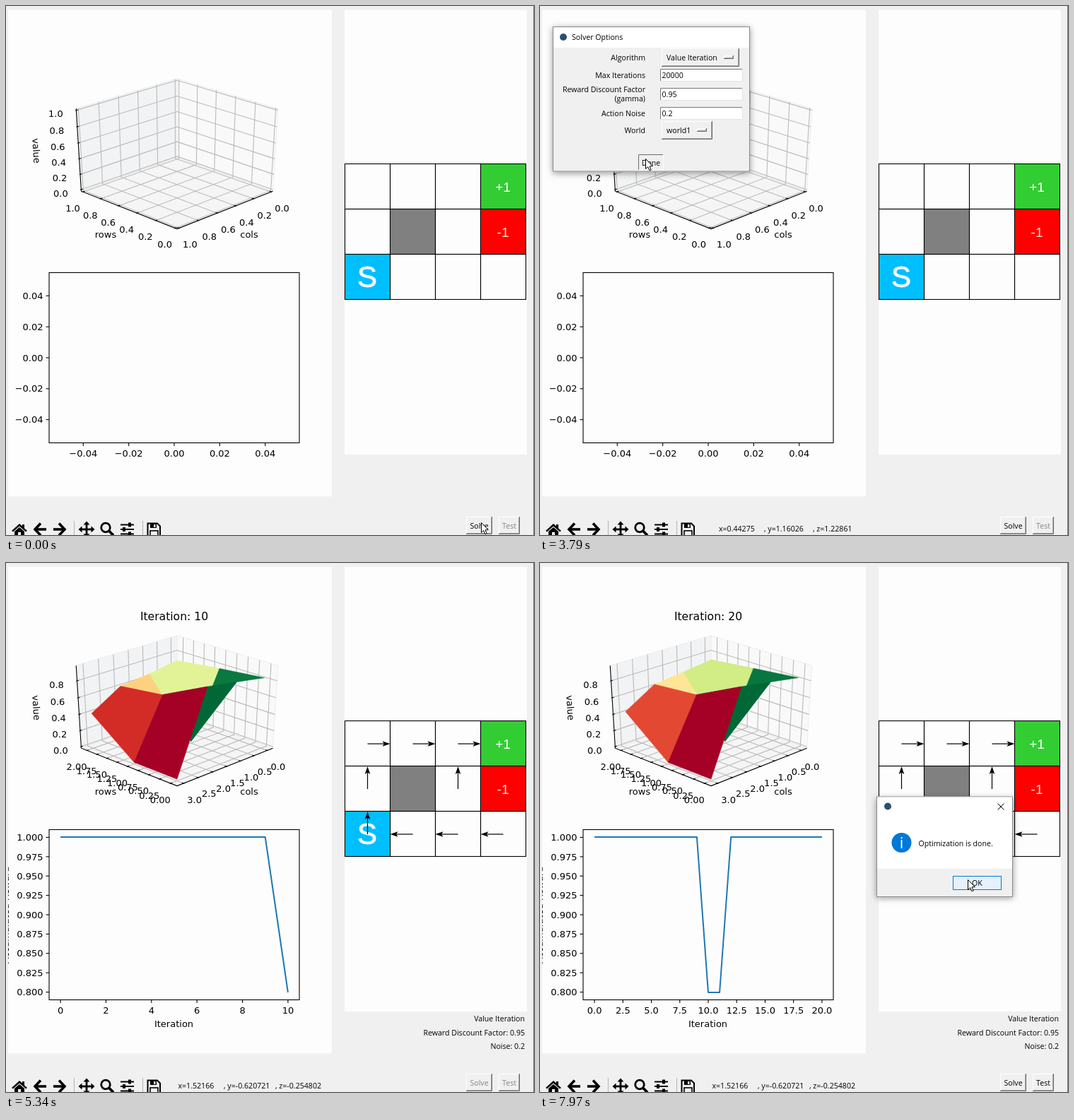
Animation, 747 px wide and 749 px high, one loop 8 s. Source, as an HTML page with a canvas:

```html
<!DOCTYPE html>
<html lang="en">
<head>
<meta charset="utf-8">
<title>Value iteration</title>
<style>
html, body { margin: 0; width: 100%; height: 100%; overflow: hidden; background: #f0f0f0; }
canvas { display: block; }
</style>
</head>
<body>
<canvas id="stage" width="747" height="749"></canvas>
<script>
const g = document.getElementById('stage').getContext('2d');
const LOOP = 8000;
const PLOT = '13px "DejaVu Sans", sans-serif';
const TITLE = '15.6px "DejaVu Sans", sans-serif';
const UI = '10.6px "Open Sans", sans-serif';
const BIG = '"Liberation Sans", Arial, sans-serif';

// ---- drawing helpers ----
function rect(x, y, w, h, fill, stroke, lw = 1) {
  if (fill) { g.fillStyle = fill; g.fillRect(x, y, w, h); }
  if (stroke) { g.strokeStyle = stroke; g.lineWidth = lw; g.strokeRect(x, y, w, h); }
}
function trace(pts, closed) {
  g.beginPath();
  pts.forEach(([x, y], i) => i ? g.lineTo(x, y) : g.moveTo(x, y));
  if (closed) g.closePath();
}
function line(pts, color = '#000', lw = 1) {
  trace(pts);
  g.strokeStyle = color; g.lineWidth = lw; g.stroke();
}
function poly(pts, fill, stroke, lw = 1) {
  trace(pts, true);
  g.fillStyle = fill; g.fill();
  if (stroke) { g.strokeStyle = stroke; g.lineWidth = lw; g.stroke(); }
}
function disc(x, y, r, fill) {
  g.beginPath(); g.arc(x, y, r, 0, 7);
  g.fillStyle = fill; g.fill();
}
function text(s, x, y, font = UI, align = 'left', color = '#000') {
  g.font = font; g.textAlign = align; g.textBaseline = 'alphabetic'; g.fillStyle = color;
  g.fillText(s, x, y + parseFloat(font) * 0.36);
}
function turned(s, x, y, angle) {
  g.save();
  g.translate(x, y); g.rotate(angle);
  text(s, 0, 0, PLOT, 'center');
  g.restore();
}

// ---- grid world solver ----
const DIRS = [[-1, 0], [0, 1], [1, 0], [0, -1]];
const GAMMA = 0.95, NOISE = 0.2;
const isWall = (r, c) => r === 1 && c === 1;
const exitReward = (r, c) => c === 3 && r < 2 ? (r ? -1 : 1) : 0;

function step(V, r, c, d) {
  const [dr, dc] = DIRS[(d + 4) % 4];
  let nr = r + dr, nc = c + dc;
  if (nr < 0 || nr > 2 || nc < 0 || nc > 3 || isWall(nr, nc)) { nr = r; nc = c; }
  return exitReward(nr, nc) || GAMMA * V[nr][nc];
}
function actions(V, r, c) {
  return DIRS.map((_, d) => (1 - NOISE) * step(V, r, c, d) +
    NOISE / 2 * (step(V, r, c, d - 1) + step(V, r, c, d + 1)));
}
const sweep = V => V.map((row, r) => row.map((_, c) =>
  isWall(r, c) || exitReward(r, c) ? 0 : Math.max(...actions(V, r, c))));

const values = [[0, 1, 2].map(() => [0, 0, 0, 0])];
for (let k = 0; k < 22; k++) values.push(sweep(values[k]));

// ---- axes helpers ----
function ticks(lo, hi) {
  const span = hi - lo, base = 10 ** (Math.floor(Math.log10(span)) - 1);
  const size = [1, 2, 2.5, 5, 10, 20].map(m => m * base).find(s => span / s <= 9);
  let digits = 0;
  while (digits < 4 && Math.abs(size * 10 ** digits - Math.round(size * 10 ** digits)) > 1e-6) digits++;
  const out = [];
  for (let i = Math.ceil(lo / size - 1e-6); i * size <= hi + 1e-6; i++)
    out.push({ v: i * size, s: (i * size).toFixed(digits).replace(/^-/, '\u2212') });
  return out;
}
function limits(lo, hi) {
  const pad = hi === lo ? 0.055 : (hi - lo) * 0.05;
  return [lo - pad, hi + pad];
}

// ---- 3D plot: unit cube seen from 45 degrees, 30 degrees up ----
const EDGE = 1 / 48, LO = -EDGE, HI = 1 + EDGE;
const COS = Math.sqrt(3) / 2, SIN = 0.5;
function view(r, c, z) {
  const side = (1 - r - c) * Math.SQRT1_2, near = (c - r) * Math.SQRT1_2, up = z - 0.5;
  const depth = 10 - near * COS - up * SIN;
  return [242 + 1888 * side / depth, 205.2 - 1296 * (up * COS - near * SIN) / depth, depth];
}
const RAMP = ['a50026', 'd73027', 'f46d43', 'fdae61', 'fee08b', 'ffffbf',
  'd9ef8b', 'a6d96a', '66bd63', '1a9850', '006837'];
function ramp(u) {
  const p = Math.min(9.9999, Math.max(0, u * 10)), i = Math.floor(p);
  const ch = (k, j) => parseInt(RAMP[k].substr(j * 2, 2), 16);
  return `rgb(${[0, 1, 2].map(j => Math.round(ch(i, j) + (ch(i + 1, j) - ch(i, j)) * (p - i)))})`;
}

function cube(V) {
  const rl = V ? [-0.1, 2.1] : [0, 1], cl = V ? [-0.15, 3.15] : [0, 1];
  const zl = [0, V ? Math.max(...V.flat()) : 1];
  const norm = (v, [a, b]) => (v - a) / (b - a);
  const path = (...p) => p.map(q => view(...q));

  poly(path([HI, HI, LO], [HI, LO, LO], [HI, LO, HI], [HI, HI, HI]), '#f2f3f4', '#ebeced');
  poly(path([HI, LO, LO], [LO, LO, LO], [LO, LO, HI], [HI, LO, HI]), '#f9f9f9', '#eeeeee');
  poly(path([HI, HI, LO], [HI, LO, LO], [LO, LO, LO], [LO, HI, LO]), '#f5f5f5', '#ebebeb');

  const rt = ticks(...rl), ct = ticks(...cl), zt = ticks(...zl);
  const grid = '#bababa';
  rt.forEach(t => { t.n = norm(t.v, rl); line(path([t.n, HI, LO], [t.n, LO, LO], [t.n, LO, HI]), grid, 1.1); });
  ct.forEach(t => { t.n = norm(t.v, cl); line(path([LO, t.n, LO], [HI, t.n, LO], [HI, t.n, HI]), grid, 1.1); });
  zt.forEach(t => { t.n = norm(t.v, zl); line(path([HI, HI, t.n], [HI, LO, t.n], [LO, LO, t.n]), grid, 1.1); });

  line(path([HI, HI, HI], [HI, HI, LO], [LO, HI, LO], [LO, LO, LO]), '#000', 1.1);
  const IN = 0.017, OUT = 0.0083;
  const mark = (a, b, p, dx, dy, s) => {
    line(path(a, b), '#000', 1.1);
    const [x, y] = view(...p);
    text(s, x + dx, y + dy, PLOT, 'center');
  };
  rt.forEach(({ n, s }) => mark([n, HI - IN, LO], [n, HI + OUT, LO], [n, HI, LO], -14.5, 23, s));
  ct.forEach(({ n, s }) => mark([LO + IN, n, LO], [LO - OUT, n, LO], [LO, n, LO], 15.5, 23, s));
  zt.forEach(({ n, s }) => mark([HI, HI - IN, n], [HI, HI + OUT, n], [HI, HI, n], -29, 5, s));
  text('rows', 141, 323, PLOT, 'center');
  text('cols', 344, 323, PLOT, 'center');
  turned('value', 43, 205, 1.51);

  if (!V) return;
  const faces = [];
  for (let r = 0; r < 2; r++) for (let c = 0; c < 3; c++) {
    const cs = [[r, c], [r, c + 1], [r + 1, c + 1], [r + 1, c]];
    const pts = cs.map(([a, b]) => view(norm(a, rl), norm(b, cl), norm(V[a][b], zl)));
    faces.push({
      pts,
      mean: cs.reduce((s, [a, b]) => s + V[a][b], 0) / 4,
      depth: pts.reduce((s, p) => s + p[2], 0)
    });
  }
  const means = faces.map(f => f.mean), low = Math.min(...means), high = Math.max(...means);
  faces.sort((a, b) => b.depth - a.depth).forEach(f => {
    const col = ramp((f.mean - low) / (high - low));
    poly(f.pts, col, col, 0.5);
  });
}

// ---- reward chart ----
const reward = i => i === 10 || i === 11 ? 0.8 : 1;
function chart(n) {
  const L = 61, R = 415, T = 377.5, B = 618.5, solved = n >= 0;
  const ys = Array.from({ length: Math.max(0, n + 1) }, (_, i) => reward(i));
  const xl = limits(0, Math.max(0, n));
  const yl = solved ? limits(Math.min(...ys), Math.max(...ys)) : limits(0, 0);
  const px = v => L + (v - xl[0]) / (xl[1] - xl[0]) * (R - L);
  const py = v => B - (v - yl[0]) / (yl[1] - yl[0]) * (B - T);
  let wide = 0;
  rect(L, T, R - L, B - T, null, '#000', 1.1);
  for (const { v, s } of ticks(...xl)) {
    line([[px(v), B], [px(v), B + 4.5]], '#000', 1.1);
    text(s, px(v), 633, PLOT, 'center');
  }
  for (const { v, s } of ticks(...yl)) {
    line([[L, py(v)], [L - 4.5, py(v)]], '#000', 1.1);
    text(s, 52.5, py(v), PLOT, 'right');
    wide = Math.max(wide, g.measureText(s).width);
  }
  if (!solved) return;
  g.lineJoin = 'round';
  line(ys.map((y, i) => [px(i), Math.round(py(y))]), '#1f77b4', 2);
  g.lineJoin = 'miter';
  text('Iteration', 237.5, 652, PLOT, 'center');
  turned('Accumulated Reward', 37 - wide, 498.5, -Math.PI / 2);
}

// ---- maze ----
function maze(V) {
  const X = c => 479.5 + 64 * c, Y = r => 223.5 + 64 * r;
  const fills = { '0,3': '#32cd32', '1,3': '#ff0000', '1,1': '#808080', '2,0': '#00bfff' };
  for (let r = 0; r < 3; r++) for (let c = 0; c < 4; c++)
    rect(X(c), Y(r), 64, 64, fills[[r, c]], '#000', 1.1);
  text('+1', 703, 256, '19px ' + BIG, 'center', '#fff');
  text('-1', 703, 320, '19px ' + BIG, 'center', '#ffe9d8');
  text('S', 511, 382.5, '42px ' + BIG, 'center', '#fff');
  g.strokeStyle = '#fff'; g.lineWidth = 0.8;
  g.strokeText('S', 511, 382.5 + 42 * 0.36);
  if (!V) return;
  for (let r = 0; r < 3; r++) for (let c = 0; c < 4; c++) {
    if (isWall(r, c) || exitReward(r, c)) continue;
    const q = actions(V, r, c), d = q.indexOf(Math.max(...q));
    g.save();
    g.translate(X(c) + 32, Y(r) + 32.5);
    g.rotate((d - 1) * Math.PI / 2);
    line([[0, 0], [26, 0]], '#000', 1.2);
    poly([[32, 0], [21, -3.8], [23.5, 0], [21, 3.8]], '#000');
    g.restore();
  }
}

// ---- window furniture ----
function bevel(x, y, w, h, sunken) {
  const a = sunken ? '#696969' : '#ffffff', b = sunken ? '#ffffff' : '#696969';
  rect(x, y, w, h, '#f0f0f0');
  line([[x + .5, y + h], [x + .5, y + .5], [x + w, y + .5]], a);
  line([[x, y + h - .5], [x + w - .5, y + h - .5], [x + w - .5, y]], b);
  if (!sunken) line([[x + 1, y + h - 1.5], [x + w - 1.5, y + h - 1.5], [x + w - 1.5, y + 1]], '#a8a8a8');
}
function button(s, x, y, w, h, off, sunken) {
  bevel(x, y, w, h, sunken);
  text(s, x + w / 2, y + h / 2 + .5, UI, 'center', off ? '#858585' : '#000');
}
function frame(x, y, w, h) {
  g.save();
  g.shadowColor = 'rgba(0,0,0,.4)'; g.shadowBlur = 9; g.shadowOffsetY = 2;
  rect(x, y, w, h, '#f0f0f0');
  g.restore();
  rect(x + .5, y + .5, w - 1, h - 1, null, '#8a8a8a');
}
function cross(x, y) {
  line([[x - 4.5, y - 4.5], [x + 4.5, y + 4.5]]);
  line([[x + 4.5, y - 4.5], [x - 4.5, y + 4.5]]);
}

function toolbar() {
  poly([[8, 743], [19, 733], [23, 736.5], [23, 734], [26, 734], [26, 739.5], [30, 743], [28, 744.5], [19, 736.5], [10, 744.5]], '#000');
  poly([[12, 744], [19, 738], [26, 744], [26, 750], [21, 750], [21, 745], [17, 745], [17, 750], [12, 750]], '#000');
  for (const [x, k] of [[48, 1], [76, -1]]) {
    line([[x + k, 732.5], [x - 7 * k, 741], [x + k, 749.5]], '#000', 3.6);
    line([[x - 6 * k, 741], [x + 9 * k, 741]], '#000', 3.6);
  }
  for (const x of [96.5, 193.5]) line([[x, 729], [x, 749]], '#b4b4b4');
  for (let i = 0; i < 4; i++) {
    g.save();
    g.translate(114, 741); g.rotate(i * Math.PI / 2);
    line([[0, 0], [0, -8]], '#000', 2.8);
    poly([[0, -11.5], [4.5, -6.5], [-4.5, -6.5]], '#000');
    g.restore();
  }
  g.beginPath(); g.arc(141, 738.5, 6.3, 0, 7);
  g.lineWidth = 2.8; g.strokeStyle = '#000'; g.stroke();
  line([[145.5, 743], [152, 749.5]], '#000', 3.8);
  [[734.5, 175], [741, 167], [747.5, 175]].forEach(([y, x]) => {
    line([[162, y], [181, y]], '#000', 2);
    rect(x - 2, y - 3, 4, 6, '#000');
  });
  poly([[200.5, 732.5], [214, 732.5], [218, 736.5], [218, 752], [200.5, 752]], '#f0f0f0', '#000', 2);
  rect(204, 733, 9, 6, '#000');
  rect(209, 734, 2.5, 4, '#f0f0f0');
  rect(204, 743, 11, 9, '#f0f0f0', '#000', 1.6);
}

function optionsDialog(dx, dy, controls, pressed) {
  g.save();
  g.translate(dx, dy);
  frame(18, 29, 279, 205.5);
  rect(19, 30, 277, 29, '#fff');
  disc(33, 44, 5, '#2d4f6e');
  text('Solver Options', 45, 44);
  if (controls) {
    line([[180, 44.5], [190, 44.5]]);
    rect(224.5, 39.5, 9, 9, null, '#c4c4c4');
    cross(273, 44);
  }
  [['Algorithm', 73], ['Max Iterations', 98], ['Reward Discount Factor', 118], ['(gamma)', 131.5],
   ['Action Noise', 152], ['World', 176]].forEach(([s, y]) => text(s, 149, y, UI, 'right'));
  [['Value Iteration', 60, 110], ['world1', 163, 72]].forEach(([s, y, w]) => {
    bevel(172, y, w, 26);
    text(s, 179, y + 13);
    bevel(172 + w - 22, y + 10, 14, 5);
  });
  [['20000', 89], ['0.95', 116], ['0.2', 143]].forEach(([s, y]) => {
    rect(170, y, 117, 18, '#fff');
    line([[170.5, y + 18], [170.5, y + .5], [287, y + .5]], '#777');
    line([[170, y + 17.5], [286.5, y + 17.5], [286.5, y]], '#e3e3e3');
    text(s, 172.5, y + 9);
  });
  button('Done', 139, 210, 36, 23, false, pressed);
  g.restore();
}

function doneDialog(hover) {
  frame(476, 330.5, 193, 142.5);
  rect(477, 331.5, 191, 101.5, '#fff');
  disc(492, 344.5, 5, '#2d4f6e');
  cross(652, 345);
  disc(511.5, 396, 14, '#0078d7');
  text('i', 511.5, 396, '22px "Open Sans", sans-serif', 'center', '#fff');
  text('Optimization is done.', 535.5, 397);
  if (hover) rect(584.5, 443.5, 68, 19, '#e5f1fb', '#0078d7', 1);
  else rect(585, 444, 67, 18, '#e1e1e1', '#0078d7', 2);
  text('OK', 618.5, 453.5, UI, 'center');
}

// ---- pointer: time, x, y ----
const TRACK = [
  [0, 672, 731], [69, 672, 731], [70, 662, 724], [600, 662, 724], [1000, 330, 280], [1390, 52, 35],
  [1690, 2, 7], [2010, 2, 7], [2090, 14, 11], [2325, 14, 11], [2760, 157, 46], [2850, 157, 46],
  [3080, 183, 224], [3160, 175, 219], [3330, 175, 216], [3560, 149, 216], [3870, 149, 216],
  [4500, 300, 775], [5850, 700, 775], [6040, 716, 729], [7210, 716, 729], [7740, 640, 414], [7960, 605, 448]
];
function pointer(t) {
  const i = TRACK.findIndex(p => p[0] > t);
  if (i < 0) return TRACK[TRACK.length - 1].slice(1);
  const [t0, x0, y0] = TRACK[i - 1], [t1, x1, y1] = TRACK[i];
  const u = (t - t0) / (t1 - t0);
  return [x0 + (x1 - x0) * u, y0 + (y1 - y0) * u];
}
const ARROW = [[0, 0], [0, 14], [3.2, 11.2], [5.5, 16.4], [7.7, 15.4], [5.5, 10.4], [9.8, 10.2]];

// ---- scene ----
const FIRST = 4010, PERIOD = 126, LAG = 20;
const iteration = t => t < FIRST ? -1 : Math.min(20, Math.floor((t - FIRST) / PERIOD));

function draw(t) {
  const n = iteration(t), V = n < 0 ? null : values[n + 1];
  const running = t >= 3870, done = t >= 6700;
  const [mx, my] = pointer(t);

  rect(0, 0, 747, 749, '#f0f0f0');
  rect(3, 5.5, 458, 689, '#fdfdfd');
  rect(479, 5.5, 258, 629.5, '#fdfdfd');
  rect(746, 0, 1, 749, '#777');

  g.save();
  g.beginPath(); g.rect(3, 5, 458, 690); g.clip();
  cube(V);
  if (V) text('Iteration: ' + n, 238, 75, TITLE, 'center');
  chart(iteration(t - LAG));
  g.restore();

  maze(V);
  toolbar();
  if (t >= 4250) {
    text('x=1.52166', 243.5, 740.5); text(', y=-0.620721', 308, 740.5); text(', z=-0.254802', 381, 740.5);
  } else if (t >= 900) {
    text('x=0.44275', 253, 740.5); text(', y=1.16026', 317, 740.5); text(', z=1.22861', 386, 740.5);
  }
  if (running) ['Value Iteration', 'Reward Discount Factor: 0.95', 'Noise: 0.2']
    .forEach((s, i) => text(s, 734, 645.5 + 19.5 * i, UI, 'right'));
  button('Solve', 651, 723, 37, 25, running && !done);
  button('Test', 697, 723, 30, 25, !done);

  if (t >= 680 && !running) {
    const [hx, hy] = t < 2325 ? [14, 11] : t < 2760 ? [mx, my] : [157, 46];
    optionsDialog(hx - 157, hy - 46, t < 3700, t >= 3700);
  }
  if (done) doneDialog(t >= 7840);
  if (t >= 2250 && t < 2800) disc(mx, my + 1, 11, '#f3df1f');
  if (t < 380 || t >= 600)
    poly(ARROW.map(([x, y]) => [mx + x + .5, my + y + .5]), '#fff', '#000', 1);
}

function tick() {
  draw(performance.now() % LOOP);
  requestAnimationFrame(tick);
}
tick();
</script>
</body>
</html>
```
